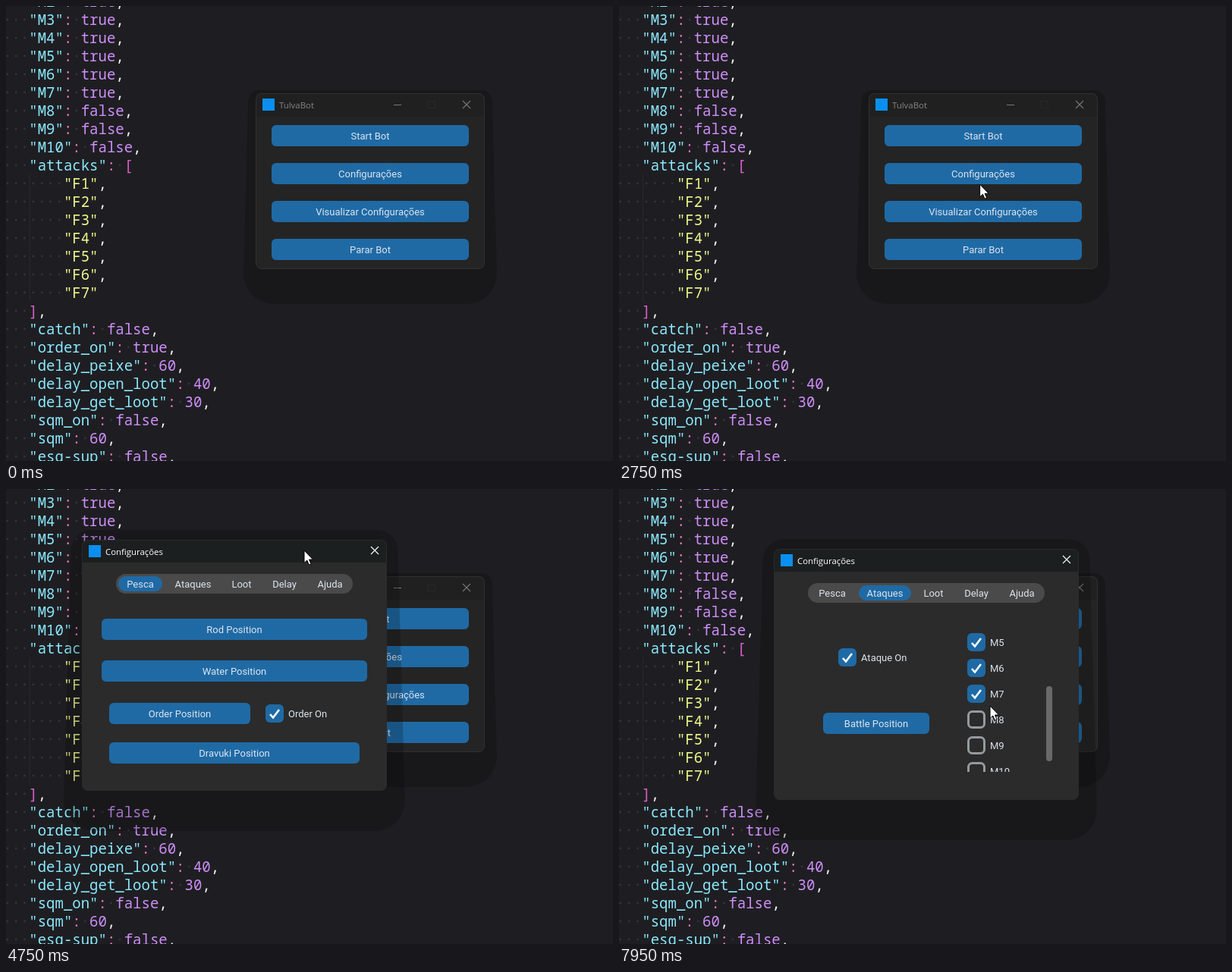
Write an HTML page with a canvas that moves like this. It is 800 px wide and 600 px high and loops after 8 s.

```html
<!DOCTYPE html>
<html lang="pt">
<head>
<meta charset="utf-8">
<title>Configurações</title>
<style>
html, body { margin: 0; height: 100%; overflow: hidden; background: #1e1e22; }
canvas { display: block; }
</style>
</head>
<body>
<canvas id="stage" width="800" height="600"></canvas>
<script>
const c = document.getElementById('stage').getContext('2d');
const LOOP = 8000, STEP = 50;
const BLUE = '#1f6aa5', DARK_BLUE = '#144870', GREY = '#4a4a4a', HOVER = '#696969', LABEL = '#dce4ee';
const UI = '13px Roboto, sans-serif', TITLE = '11.4px "Open Sans", sans-serif';
const CODE = '500 19px "Noto Sans Mono", monospace', CELL = 11.4;

// time, x, y
const cursorKeys = [
  [150, 535, 4], [400, 472, 172], [550, 472, 172], [800, 475, 218], [1350, 475, 218],
  [1650, 470, 318], [1750, 470, 318], [2000, 473, 256], [2100, 474, 240], [2200, 474, 240],
  [2500, 474, 268], [2950, 477, 209], [3700, 477, 209], [4300, 135, 90], [4400, 120, 81],
  [4450, 120, 81], [4750, 393, 81], [5000, 497, 93], [5200, 497, 93], [5400, 486, 118],
  [5550, 486, 118], [5700, 425, 139], [5750, 402, 145], [6050, 350, 141], [6450, 350, 141],
  [6500, 396, 143], [6550, 399, 151], [6750, 440, 210], [7100, 489, 286]
];
const scrollTimes = [7250, 7350, 7450, 7600, 7650, 7900, 7950];

const arrow = new Path2D('M0 0V16.5L3.8 13L6.3 19L9 17.8L6.5 12H11.5Z');
const hand = new Path2D('M-1.6 1a1.7 1.7 0 0 1 3.4 0V8l6.5 1.4q2 .6 2 2.6v4q-1 3-2 6h-8q-1-3-3.4-6l-2.4-4q0-2.5 2.8-1l1.1 1.5z');

let t, now, late, overButton;

function cursorAt(time) {
  const i = cursorKeys.findIndex(k => k[0] > time);
  if (i === 0) return [-99, -99];
  if (i < 0) return cursorKeys.at(-1).slice(1);
  const [t0, x0, y0] = cursorKeys[i - 1], [t1, x1, y1] = cursorKeys[i];
  const p = (time - t0) / (t1 - t0);
  return [x0 + (x1 - x0) * p, y0 + (y1 - y0) * p];
}

const inside = ([px, py], x, y, w, h) => px >= x && px < x + w && py >= y && py < y + h;

function box(x, y, w, h, r, fill, stroke, line = 1) {
  c.beginPath();
  c.roundRect(x, y, w, h, r);
  if (fill) { c.fillStyle = fill; c.fill(); }
  if (stroke) { c.strokeStyle = stroke; c.lineWidth = line; c.stroke(); }
}

function text(s, x, y, color = LABEL, align = 'left', font = UI) {
  c.font = font;
  c.fillStyle = color;
  c.textAlign = align;
  c.fillText(s, x, y);
}

function lines(color, width, ...paths) {
  c.strokeStyle = color;
  c.lineWidth = width;
  c.beginPath();
  for (const [x, y, ...rest] of paths) {
    c.moveTo(x, y);
    for (let i = 0; i < rest.length; i += 2) c.lineTo(rest[i], rest[i + 1]);
  }
  c.stroke();
}

function button(s, x, y, w, live = true, h = 28, r = 6, fill = BLUE, hover = DARK_BLUE) {
  if (live && inside(now, x, y, w, h)) overButton = true;
  box(x, y, w, h, r, live && inside(late, x, y, w, h) ? hover : fill);
  text(s, x + w / 2, y + h / 2 + 4.5, LABEL, 'center');
}

function checkbox(s, x, y, on = true) {
  if (on) {
    box(x, y, 24, 24, 6, BLUE);
    lines('#fff', 2.6, [x + 6, y + 13, x + 10, y + 17.5, x + 18, y + 7]);
  } else {
    box(x + 1.5, y + 1.5, 21, 21, 5, null, '#949a9f', 3);
  }
  text(s, x + 30, y + 16.5);
}

// Flat shadow, wider at the bottom
function shadow(x, y, w, h, top, side, bottom, alpha = .2) {
  const s = side * .55, r = 40, x1 = x + w, b = y + h + bottom;
  c.fillStyle = `rgba(0,0,0,${alpha})`;
  c.beginPath();
  c.moveTo(x + w / 2, y - top);
  c.arcTo(x1 + s, y - top, x1 + side, b, top * 1.5 + 8);
  c.arcTo(x1 + side, b, x, b, r);
  c.arcTo(x - side, b, x - s, y - top, r);
  c.arcTo(x - s, y - top, x1, y - top, top * 1.5 + 8);
  c.fill();
}

const cross = (x, y, color) =>
  lines(color, 1.1, [x - 5, y - 5, x + 5, y + 5], [x + 5, y - 5, x - 5, y + 5]);

function frame(x, y, w, h, bar, body, title, active) {
  box(x, y, w, h, 8, body);
  box(x, y, w, bar, [8, 8, 0, 0], active ? '#1c1f1f' : '#202020');
  box(x + .5, y + .5, w - 1, h - 1, 8, null, active ? '#292b2b' : '#303030');
  box(x + 9, y + 7, 16, 16, 0, '#0a8ff0');
  text(title, x + 31, y + 20, active ? '#fff' : '#858585', 'left', TITLE);
}

function codeLine(y, indent, parts) {
  let col = 0;
  const dot = i => {
    c.fillStyle = '#333339';
    c.beginPath();
    c.arc(30.3 + (i + .5) * CELL, y, 1.4, 0, 7);
    c.fill();
  };
  for (let i = -3; i < indent; i++) dot(i);
  col = indent;
  for (const [s, color] of parts) {
    if (s === ' ') dot(col);
    else text(s, 30.3 + col * CELL, y + 7, color, 'left', CODE);
    col += s.length;
  }
}

function editor() {
  const CYAN = '#8be9fd', PINK = '#ff79c6', PURPLE = '#cf8ef8', WHITE = '#f8f8f2', BRACKET = '#dc5fcb';
  const pair = (y, key, value) => codeLine(y, 0, [
    [`"${key}"`, CYAN], [':', PINK], [' '], [value, value === '[' ? BRACKET : PURPLE],
    [value === '[' ? '' : ',', WHITE]
  ]);
  for (let i = 2; i <= 10; i++) pair(24 * i - 54, 'M' + i, String(i < 8));
  pair(210, 'attacks', '[');
  for (let i = 1; i <= 7; i++)
    codeLine(210 + 24 * i, 4, [[`"F${i}"`, '#f1fa8c'], [i < 7 ? ',' : '', WHITE]]);
  lines('#29292e', 1, [31.5, 222, 31.5, 390]);
  codeLine(402, 0, [[']', BRACKET], [',', WHITE]]);
  Object.entries({
    catch: false, order_on: true, delay_peixe: 60, delay_open_loot: 40,
    delay_get_loot: 30, sqm_on: false, sqm: 60, 'esq-sup': false
  }).forEach(([key, value], i) => pair(426 + 24 * i, key, String(value)));
}

function mainWindow() {
  const active = t >= 3200 && t < 3700, ink = active ? '#fff' : '#777';
  if (active) shadow(329, 115, 302, 232, 13, 25, 53);
  else shadow(329, 115, 302, 232, 4, 17, 46);
  frame(329, 115, 302, 232, 31, '#242424', 'TulvaBot', active);
  lines(ink, 1, [511, 130.5, 521, 130.5]);
  box(556.5, 125.5, 9, 9, 0, null, active ? '#5a5c5c' : '#282828');
  cross(607, 130, ink);
  ['Start Bot', 'Configurações', 'Visualizar Configurações', 'Parar Bot']
    .forEach((s, i) => button(s, 350, 157 + 50 * i, 260, t < 4400));
}

function openingWindow(alpha) {
  c.globalAlpha = alpha;
  shadow(-173, 69, 401, 326, 0, 4, 22, .2);
  box(-173, 69, 401, 326, 6, null, '#303033', 2.5);
  box(-173, 68, 401, 30, [6, 6, 0, 0], '#f6f6f6');
  cross(213, 82, '#666');
  c.globalAlpha = 1;
}

function fishingTab(x, y) {
  button('Rod Position', x + 26, y + 104, 350);
  button('Water Position', x + 26, y + 159, 350);
  button('Order Position', x + 36, y + 215, 186);
  checkbox('Order On', x + 242, y + 217);
  button('Dravuki Position', x + 36, y + 267, 330);
}

function attackTab(x, y) {
  const steps = scrollTimes.filter(s => s <= t).length / scrollTimes.length;
  checkbox('Ataque On', x + 85, y + 131);
  button('Battle Position', x + 65, y + 216, 140);
  c.save();
  c.beginPath();
  c.rect(x + 250, y + 102, 105, 192);
  c.clip();
  const top = y + 102 - 160 * steps;
  box(x + 260, top, 90, 28, 6, GREY);
  text('Ataques', x + 304.5, top + 18.5, LABEL, 'center');
  for (let i = 0; i < 10; i++) checkbox('M' + (i + 1), x + 255, top + 33 + 34 * i, i < 7);
  c.restore();
  box(x + 359, y + 106 + 75 * steps, 8, 99, 4, HOVER);
}

function configWindow() {
  // Dragged by its title bar
  const [gx, gy] = cursorAt(Math.min(Math.max(t, 4450), 5000));
  const x = Math.round(gx) - 293, y = Math.round(gy) - 14;
  shadow(x, y, 402, 331, 13, 25, 53);
  frame(x, y, 402, 331, 30, '#2b2b2b', 'Configurações', true);
  cross(x + 386, y + 14, '#fff');

  const tab = t < 6200 ? 0 : 1;
  box(x + 45, y + 45, 312, 26, 13, GREY);
  [['Pesca', 48, 58], ['Ataques', 112, 69], ['Loot', 187, 47], ['Delay', 240, 54], ['Ajuda', 300, 54]]
    .forEach(([s, dx, w], i) => button(s, x + dx, y + 48, w, t >= 5000, 20, 10,
      i === tab ? BLUE : GREY, i === tab ? DARK_BLUE : HOVER));
  (tab ? attackTab : fishingTab)(x, y);
}

function pointer() {
  const shape = overButton ? hand : arrow;
  c.save();
  c.translate(...now);
  c.fillStyle = '#fff';
  c.strokeStyle = '#000';
  c.lineWidth = 1;
  c.fill(shape);
  c.stroke(shape);
  c.restore();
}

function draw() {
  t = Math.floor(performance.now() % LOOP / STEP) * STEP;
  now = cursorAt(t);
  late = cursorAt(t - STEP);
  overButton = false;
  c.fillStyle = '#1e1e22';
  c.fillRect(0, 0, 800, 600);
  editor();
  mainWindow();
  if (t >= 3700) configWindow();
  else if (t >= 3600) openingWindow(t < 3650 ? .35 : .73);
  pointer();
  requestAnimationFrame(draw);
}
draw();
</script>
</body>
</html>
```
